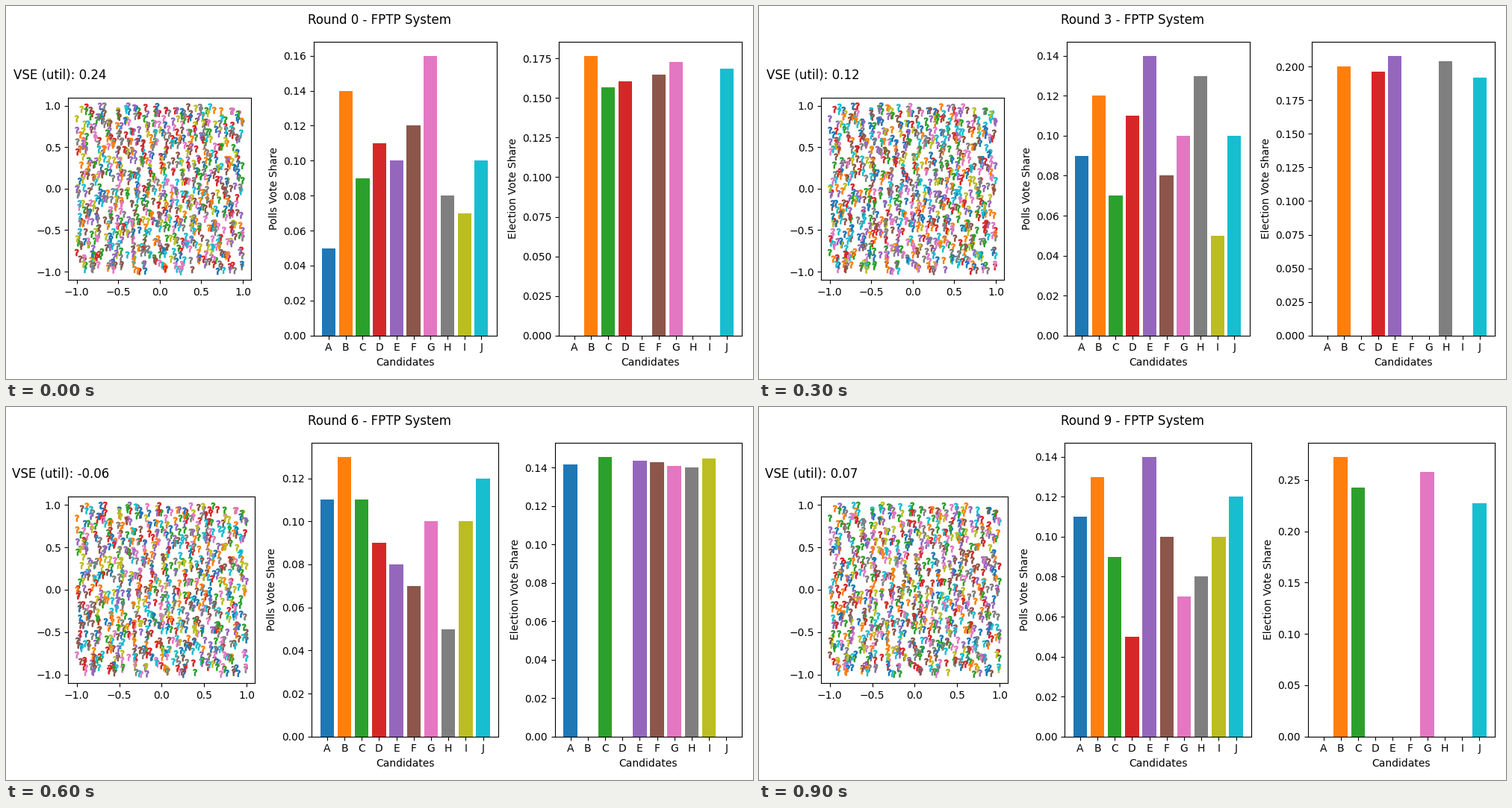
Animation, 1000 px wide and 500 px high, one loop 1 s. Source, as a matplotlib script:

```python
import matplotlib.pyplot as plt
import numpy as np
from matplotlib.animation import FuncAnimation

NAMES = "ABCDEFGHIJ"
COLORS = [f"C{k}" for k in range(len(NAMES))]

# Per round: VSE, poll ranking, leader's percent,
# election ranking, winner's lead over an even split in percent
ROUNDS = [
    (0.24, "GBFDEJCHIA", 16, "BGJFDC", 6),
    (-0.27, "EFGBHCDJIA", 13, "ICJB", 8),
    (0.41, "AIEJFGCHDB", 14, "IGDFE", 5),
    (0.12, "EHBDGJAFCI", 14, "EHBDJ", 4),
    (-0.29, "IDCBEHAJFG", 15, "IHEJA", 4),
    (0.18, "HCFGAJDBEI", 14, "CHGF", 5),
    (-0.06, "BJCAGIDEFH", 13, "CIEFAGH", 2),
    (-0.15, "IADGCHBEJF", 14, "IADG", 6),
    (-0.28, "CIGABEFJHD", 14, "HEICA", 8),
    (0.07, "EBJAFICHGD", 14, "BGCJ", 9),
]


def make_voters(cols=30, rows=30, spread=2.3):
    """Loosely stratified positions in the square from -1 to 1."""
    rng = np.random.default_rng(7)
    cells = np.stack(np.meshgrid(np.arange(cols), np.arange(rows)), -1)
    cells = cells.reshape(-1, 2) + rng.uniform(0, spread, (cols * rows, 2))
    points = cells / (cols, rows) % 1 * 2 - 1
    return rng.permutation(points)


def poll_shares(ranking, top, mean=10, low=5):
    """Whole percents on an S-curve from the leader down to the last."""
    u = np.linspace(1, -1, len(ranking))
    curve = 0.6 * u + 0.4 * u**3
    percent = np.round(mean + curve * np.where(u > 0, top - mean, mean - low))
    return dict(zip(ranking, percent / 100))


def election_shares(ranking, lead):
    """Shares falling evenly around an equal split."""
    n = len(ranking)
    return dict(zip(ranking, (1 + np.linspace(lead, -lead, n) / 100) / n))


VOTERS = make_voters()

fig = plt.figure(figsize=(10, 5), dpi=100)


def draw_voters(ax, i, vse):
    rng = np.random.default_rng(100 + i)
    choice = rng.integers(len(NAMES), size=len(VOTERS))
    ax.scatter(*VOTERS.T, c=[COLORS[k] for k in choice], marker="$?$")
    ticks = np.linspace(-1, 1, 5)
    ax.set(xlim=(-1.1, 1.1), ylim=(-1.1, 1.1), aspect="equal",
           xticks=ticks, yticks=ticks)
    ax.text(-0.3, 1.1, f"VSE (util): {vse:.2f}", fontsize=12,
            transform=ax.transAxes)


def draw_bars(ax, shares, label):
    ax.bar(list(NAMES), [shares.get(n, 0) for n in NAMES], color=COLORS)
    ax.set(xlabel="Candidates", ylabel=f"{label} Vote Share")


def update(i):
    vse, poll_rank, top, vote_rank, lead = ROUNDS[i]
    fig.clear()
    # tight_layout depends on the margins it starts from
    fig.subplots_adjust(left=0.125, right=0.9, bottom=0.11, top=0.88,
                        wspace=0.2, hspace=0.2)
    fig.suptitle(f"Round {i} - FPTP System")
    field, polls, election = fig.subplots(1, 3)
    draw_voters(field, i, vse)
    draw_bars(polls, poll_shares(poll_rank, top), "Polls")
    draw_bars(election, election_shares(vote_rank, lead), "Election")
    fig.tight_layout()
    return []


anim = FuncAnimation(fig, update, frames=len(ROUNDS), interval=100,
                     init_func=lambda: [], repeat=True)
plt.show()
```
